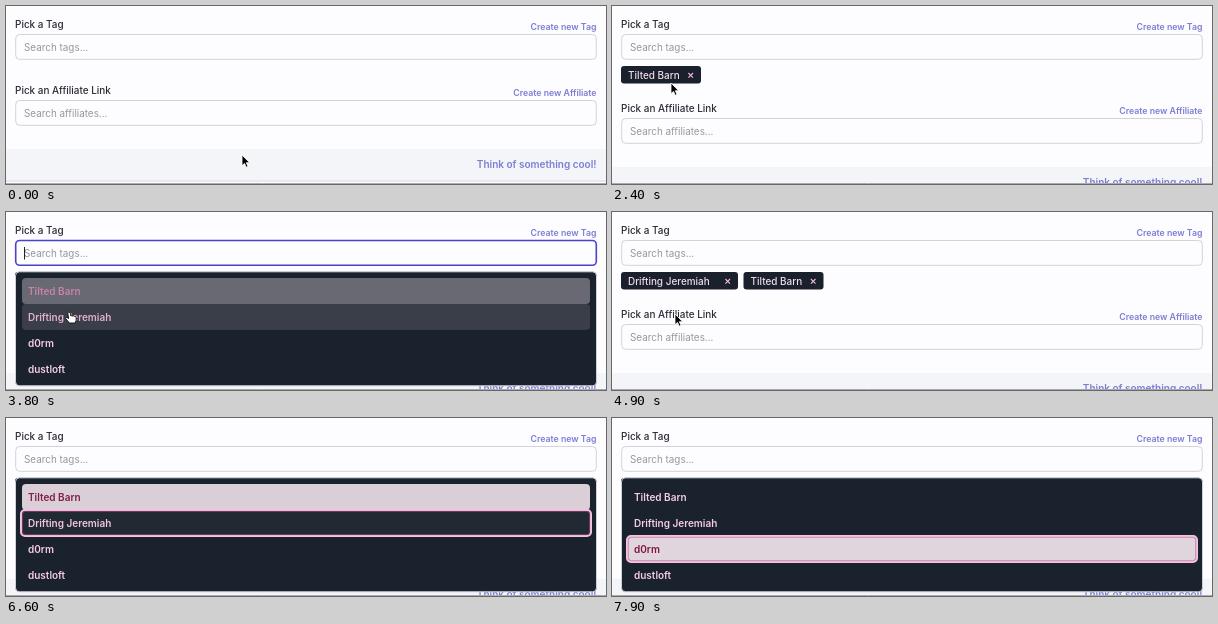
Animation of 600 by 178 pixels, one loop 8 s. Source, as an HTML page:

```html
<!DOCTYPE html>
<html lang="en">
<head>
<meta charset="utf-8">
<title>Tag picker</title>
<style>
  html, body { margin: 0; width: 100%; height: 100%; overflow: hidden; background: #fdfcfe; }
  svg { display: block; width: 600px; height: 178px; }
  text { font: 500 9.95px Inter, "Open Sans", sans-serif; fill: #2a2c36; }
  .hint { font-weight: 400; font-size: 9.9px; fill: #96979f; }
  .link { font-weight: 600; font-size: 8.75px; fill: #7b7ed5; text-anchor: end; }
  .cta { font-size: 10px; }
  .field { fill: #fdfcfe; stroke: #d3d3da; }
  .field.focus { stroke: #4a42cb; stroke-width: 1.6; }
  .chip rect { fill: #1a202c; }
  .chip text { fill: #f0deea; }
  .chip path { stroke: #f5b7dc; stroke-width: 1.1; }
  .item text { font-weight: 600; font-size: 10px; }
</style>
</head>
<body>
<svg viewBox="0 0 600 178">
  <text x="9" y="21.5">Pick a Tag</text>
  <text class="link" x="590.5" y="23.7">Create new Tag</text>
  <rect id="field" class="field" x="9.7" y="28.5" width="580.6" height="24.8" rx="4"/>
  <text class="hint" x="18" y="44.6">Search tags...</text>
  <path id="caret" d="M18.5 35V47.5" stroke="#222"/>

  <g id="chips"></g>

  <g id="lower">
    <text x="9" y="87.5">Pick an Affiliate Link</text>
    <text class="link" x="590.5" y="89.7">Create new Affiliate</text>
    <rect class="field" x="9.7" y="94.5" width="580.6" height="24.8" rx="4"/>
    <text class="hint" x="18" y="110.6">Search affiliates...</text>
    <rect y="143" width="600" height="32" fill="#f4f5f8"/>
    <path d="M0 175H600" stroke="#d8d8de"/>
    <text class="link cta" x="590.5" y="162">Think of something cool!</text>
  </g>
  <path d="M0 177.5H600" stroke="#a9a9af"/>

  <g id="menu">
    <rect x="9.5" y="59.8" width="581" height="114" rx="4" fill="#1a222d" stroke="#d0d1d8"/>
    <g id="items"></g>
    <g id="ring" fill="none">
      <rect x="15" y="66" width="570" height="26" rx="4" stroke="#f4c3e1" stroke-width="2"/>
      <rect x="16.3" y="67.3" width="567.4" height="23.4" rx="3" stroke="#b9548c" stroke-width=".6"/>
    </g>
  </g>

  <g id="pointer">
    <path id="arrow" d="M0 0V10.6L2.5 8.4L4.2 12.2L6 11.4L4.3 7.7H7.6Z" fill="#000" stroke="#fff" stroke-width=".8"/>
    <path id="hand" d="M-1.2 .8Q0 -.9 1.2 .8L1.9 4Q3 3 3.8 4.1Q5 3.3 5.6 4.5Q7 4 7.2 5.6Q7.6 8.4 6.2 11H.4Q-1.6 8.2 -3.4 6.4Q-3.2 4.8 -1.4 5.9L-.3 6.6Z" fill="#fff" stroke="#111" stroke-width=".9"/>
    <path id="beam" d="M-2 -5.5Q0 -5.5 0 -4Q0 -5.5 2 -5.5M0 -4V4M-2 5.5Q0 5.5 0 4Q0 5.5 2 5.5" fill="none" stroke="#333"/>
  </g>
</svg>
<script>
const LOOP = 8000, GLIDE = 450, FADE = 300, ROW = 26;
const KEYBOARD = 6080; // arrow keys take over from the mouse
const tags = ["Tilted Barn", "Drifting Jeremiah", "d0rm", "dustloft"];
const opens = [800, 3350, 5450], picks = [1900, 4500];

// when the pointer sets off, and where to
const moves = [
  { at: 200, x: 100, y: 42 },
  { at: 1050, x: 63, y: 68 },
  { at: 1600, x: 59, y: 77 },
  { at: 2850, x: 62, y: 42 },
  { at: 3400, x: 63, y: 102 },
  { at: 4950, x: 60, y: 42 }
];
// highlighted row from each moment on
const steps = [
  { at: 1500, row: 0 },
  { at: 3590, row: 0 },
  { at: 3755, row: 1 },
  { at: KEYBOARD, row: 0 },
  { at: 6590, row: 1 },
  { at: 7070, row: 2 }
];

const el = id => document.getElementById(id);
const show = (id, on) => el(id).style.display = on ? "" : "none";
const clamp = u => Math.max(0, Math.min(1, u));
const smooth = u => u * u * (3 - 2 * u);
const mix = (a, b, u) => a + (b - a) * u;
const blend = (a, b, u) => `rgb(${a.map((v, i) => Math.round(mix(v, b[i], u)))})`;

function pointerAt(t) {
  let x = 236, y = 149;
  for (const m of moves) {
    const u = smooth(clamp((t - m.at) / GLIDE));
    x = mix(x, m.x, u);
    y = mix(y, m.y, u);
  }
  return [x, y];
}

// Each row fades towards lit or unlit at a constant rate since the menu opened.
function glow(row, opened, t) {
  let v = 0;
  steps.forEach((s, i) => {
    if (s.at < opened || s.at > t) return;
    const next = steps[i + 1], end = next ? Math.min(t, next.at) : t;
    v = clamp(v + (s.row === row ? 1 : -1) * (end - s.at) / FADE);
  });
  return v;
}

el("items").innerHTML = tags.map((name, i) => `<g class="item" transform="translate(0 ${i * ROW})">
  <rect x="16" y="66" width="568" height="26" rx="4" fill="#e1d5dd"/>
  <text x="22" y="82.5">${name}</text></g>`).join("");
const items = [...el("items").children];

const chip = (x, w, name) => `<g class="chip" transform="translate(${x} 60)">
  <rect width="${w}" height="17.5" rx="3"/><text x="7" y="12.7">${name}</text>
  <path d="M${w - 12.6} 7l4.6 4.6m0 -4.6l-4.6 4.6"/></g>`;
const chipSets = [
  "",
  chip(9, 80, tags[0]),
  chip(9, 117, tags[1]) + chip(131.5, 80, tags[0])
];
let shown = 0;

function draw(t) {
  const picked = picks.filter(p => p <= t).length;
  if (picked !== shown) el("chips").innerHTML = chipSets[shown = picked];
  el("lower").setAttribute("transform", `translate(0 ${picked ? 18 : 0})`);

  const opened = opens[picked], open = t >= opened;
  const focus = open && t < KEYBOARD;
  el("field").classList.toggle("focus", focus);
  show("caret", focus && (t - opened) % 1000 < 500);

  show("menu", open);
  items.forEach((item, i) => {
    const v = glow(i, opened, t);
    item.children[0].style.opacity = v;
    item.children[1].style.fill = blend([246, 205, 230], [125, 22, 68], v);
  });
  show("ring", t >= KEYBOARD);
  const active = steps.filter(s => s.at <= t).pop();
  el("ring").setAttribute("transform", `translate(0 ${active ? active.row * ROW : 0})`);

  const [x, y] = pointerAt(t);
  const onField = y > 28 && y < 54, onItem = open && y > 66;
  el("pointer").setAttribute("transform", `translate(${x} ${y})`);
  show("pointer", t < KEYBOARD);
  show("beam", onField);
  show("hand", onItem);
  show("arrow", !onField && !onItem);
}

const start = performance.now();
function tick() {
  draw((performance.now() - start) % LOOP);
  requestAnimationFrame(tick);
}
tick();
</script>
</body>
</html>
```
